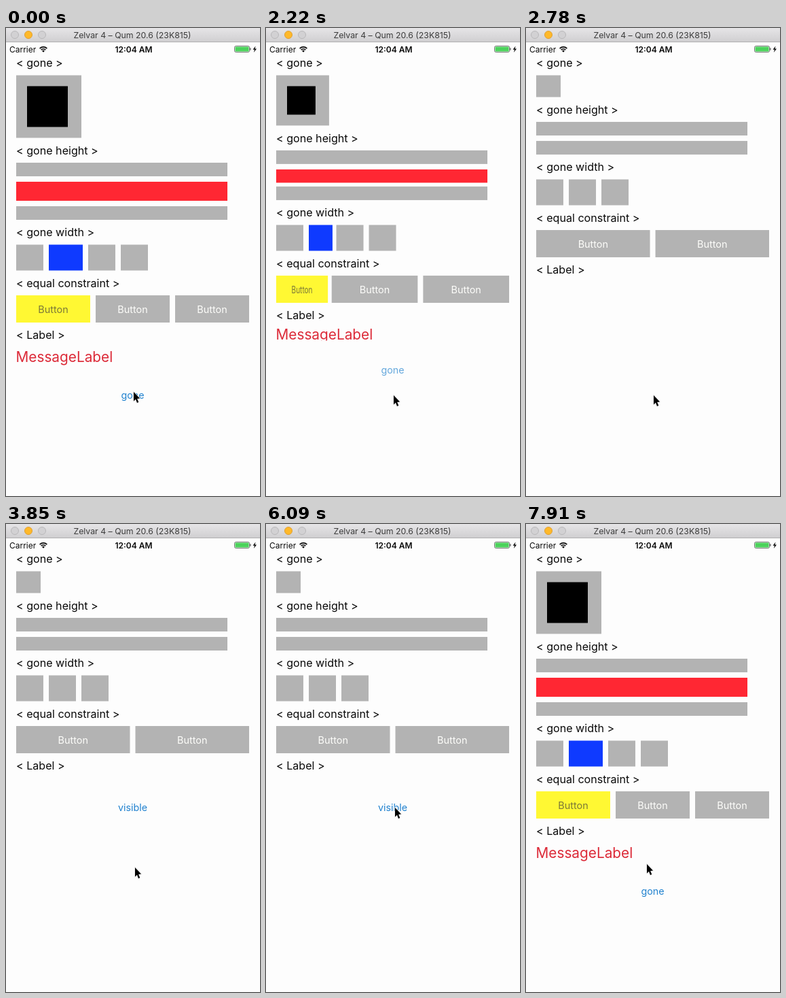
These frames come from a looping animation (374x688 px, 8 s). An HTML page with a canvas:

```html
<!DOCTYPE html>
<html lang="en">
<head>
<meta charset="utf-8">
<title>Gone and visible constraints</title>
<style>
html, body { margin: 0; width: 100%; height: 100%; overflow: hidden; background: #fdfdfd; }
canvas { display: block; width: 374px; height: 688px; }
</style>
</head>
<body>
<canvas id="stage"></canvas>
<script>
const WIDTH = 374, HEIGHT = 688, LOOP = 8000;
const HIDE_START = 1893, SHOW_START = 6442, DURATION = 900, FADE_IN = 250;
const GRAY = '#b3b3b3', PALE = '#fdfdfa', LINK = '#2182cf', INK = '#0a0a0a';

// time, x, y of the pointer tip
const POINTER_PATH = [
  [0, 188, 535], [1650, 188, 535], [1850, 188, 540], [3390, 188, 540],
  [3850, 190, 505], [4230, 190, 481], [4970, 190, 423], [5400, 190, 417],
  [6120, 190, 417], [6380, 190, 422], [6960, 190, 422], [7450, 178, 534],
  [7600, 178, 534], [7900, 178, 500], [LOOP, 178, 500]
];

const canvas = document.getElementById('stage');
const ctx = canvas.getContext('2d');
const ratio = window.devicePixelRatio || 1;
canvas.width = WIDTH * ratio;
canvas.height = HEIGHT * ratio;

const clamp = v => Math.min(1, Math.max(0, v));
const ease = u => u * u * (3 - 2 * u);

function rect(x, y, w, h, color) {
  ctx.fillStyle = color;
  ctx.fillRect(x, y, w, h);
}

function text(str, x, y, size, color, { align = 'left', weight = 400 } = {}) {
  ctx.font = `${weight} ${size}px Inter, Roboto, sans-serif`;
  ctx.textAlign = align;
  ctx.fillStyle = color;
  ctx.fillText(str, x, y);
}

function polygon(points, fill, stroke) {
  ctx.beginPath();
  points.forEach(([x, y]) => ctx.lineTo(x, y));
  ctx.closePath();
  if (stroke) {
    ctx.strokeStyle = stroke;
    ctx.lineWidth = 1.4;
    ctx.stroke();
  }
  ctx.fillStyle = fill;
  ctx.fill();
}

function drawTitleBar() {
  const shade = ctx.createLinearGradient(0, 0, 0, 20);
  shade.addColorStop(0, '#e6e5e7');
  shade.addColorStop(1, '#d0cfd1');
  rect(0, 0, WIDTH, 20, shade);
  rect(0, 20, WIDTH, 1, '#b0afb1');
  ['#d2d1d3', '#ffb92a', '#d2d1d3'].forEach((color, i) => {
    ctx.beginPath();
    ctx.arc(13 + 20 * i, 10, 5.5, 0, Math.PI * 2);
    ctx.fillStyle = color;
    ctx.fill();
    ctx.strokeStyle = i === 1 ? '#dfa033' : '#b9b8ba';
    ctx.lineWidth = 1;
    ctx.stroke();
  });
  text('Zelvar 4 – Qum 20.6 (23K815)', 186, 15, 12.3, '#3c3c3c', { align: 'center' });
}

function drawStatusBar() {
  text('Carrier', 5, 35.5, 12, INK);
  ctx.strokeStyle = INK;
  ctx.lineWidth = 1.7;
  for (const r of [4.7, 7.6]) {
    ctx.beginPath();
    ctx.arc(55, 35.5, r, -Math.PI * 0.75, -Math.PI * 0.25);
    ctx.stroke();
  }
  polygon([[53, 33.6], [55, 32.6], [57, 33.6], [55, 35.7]], INK);
  text('12:04 AM', 188, 35.5, 12, INK, { align: 'center', weight: 600 });

  ctx.strokeStyle = '#555';
  ctx.lineWidth = 0.8;
  ctx.beginPath();
  ctx.roundRect(336.5, 26.5, 22, 9, 2);
  ctx.stroke();
  rect(337.5, 27.5, 20, 7, '#4cd25c');
  rect(359.3, 29.3, 1.2, 3.4, '#555');
  polygon([[367.5, 26.5], [363.5, 31.8], [366, 31.8], [364.8, 36], [369, 30.4], [366.5, 30.4]], INK);
}

function drawButton(x, y, w, fill, color, scale = 1) {
  rect(x, y, w, 40, fill);
  ctx.save();
  ctx.translate(x + w / 2, y + 25.5);
  ctx.scale(scale, 1);
  text('Button', 0, 0, 14.4, color, { align: 'center' });
  ctx.restore();
}

function heading(label, y) {
  text(`< ${label} >`, 15, y + 6, 16.1, INK);
}

// p runs from 0 (gone) to 1 (visible)
function drawLayout(p) {
  heading('gone', 51);
  rect(15, 69.5, 36 + 60 * p, 32 + 60 * p, GRAY);
  rect(31, 85.5, 60 * p, 60 * p, '#000');

  let y = 120 + 60 * p;
  heading('gone height', y);
  rect(15, y + 18, 311, 20, GRAY);
  rect(15, y + 46, 311, 28 * p, '#ff2733');
  rect(15, y + 46 + 36 * p, 311, 20, GRAY);

  y = 204 + 96 * p;
  heading('gone width', y);
  rect(15, y + 18.5, 40, 38, GRAY);
  rect(63, y + 18.5, 50 * p, 38, '#0f3aff');
  rect(63 + 58 * p, y + 18.5, 40, 38, GRAY);
  rect(111 + 58 * p, y + 18.5, 40, 38, GRAY);

  y = 279 + 96 * p;
  heading('equal constraint', y);
  const w = (335 - 117 * p) / 2;
  if (p > 0) drawButton(15, y + 18, 109 * p, '#fff833', '#7b7838', p);
  drawButton(15 + 117 * p, y + 18, w, GRAY, PALE);
  drawButton(358 - w, y + 18, w, GRAY, PALE);

  y = 355 + 96 * p;
  heading('Label', y);
  ctx.save();
  ctx.beginPath();
  ctx.rect(0, y + 18.5, WIDTH, 27 * p);
  ctx.clip();
  text('MessageLabel', 14.5, y + 18.5 + 13.5 * p + 8, 20.8, '#dc2a38');
  ctx.restore();
}

function drawToggle(title, p, alpha) {
  ctx.save();
  ctx.globalAlpha = alpha;
  ctx.translate(186.5, 422 + 122.5 * p);
  if (title === 'visible') ctx.scale((43 - 9 * p) / 43, 1);
  text(title, 0, 0, 14.3, LINK, { align: 'center' });
  ctx.restore();
}

function drawPointer(t) {
  const i = POINTER_PATH.findIndex(key => key[0] > t);
  const [t0, x0, y0] = POINTER_PATH[i - 1], [t1, x1, y1] = POINTER_PATH[i];
  const u = (t - t0) / (t1 - t0);
  ctx.save();
  ctx.translate(x0 + (x1 - x0) * u, y0 + (y1 - y0) * u);
  polygon([[0, 0], [0, 13.5], [3, 10.8], [5, 16], [7.2, 15], [5.1, 10], [9, 9.5]], '#000', '#e8e8e8');
  ctx.restore();
}

function draw(t) {
  const hiding = ease(clamp((t - HIDE_START) / DURATION));
  const showing = ease(clamp((t - SHOW_START) / DURATION));
  const p = 1 - hiding + showing;

  // The old title fades with the layout, then the new one fades in.
  let title = 'gone', alpha = 1 - hiding;
  if (showing === 1) {
    alpha = clamp((t - SHOW_START - DURATION) / FADE_IN);
  } else if (hiding === 1) {
    title = 'visible';
    alpha = clamp((t - HIDE_START - DURATION) / FADE_IN) * (1 - showing);
  }

  ctx.setTransform(ratio, 0, 0, ratio, 0, 0);
  rect(0, 0, WIDTH, HEIGHT, '#fdfdfd');
  drawTitleBar();
  drawStatusBar();
  drawLayout(p);
  drawToggle(title, p, alpha);
  drawPointer(t);
}

function frame() {
  draw(performance.now() % LOOP);
  requestAnimationFrame(frame);
}
frame();
</script>
</body>
</html>
```
